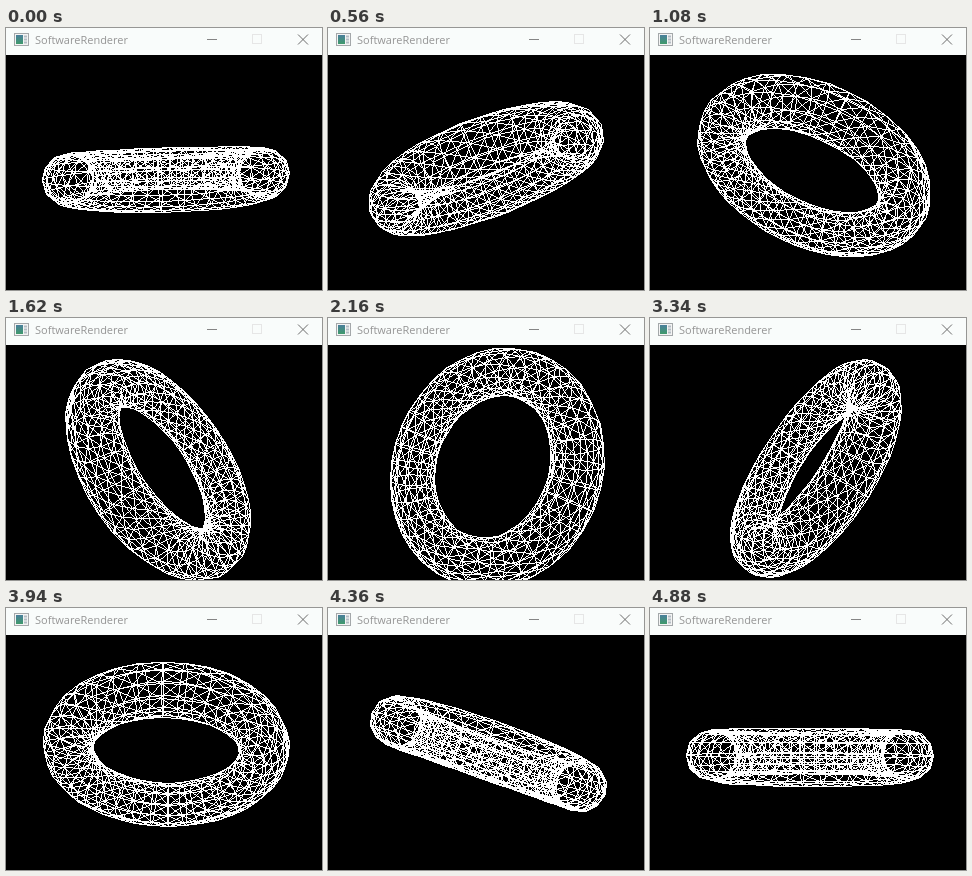
Recreate the animation shown at these times as an HTML page with a canvas. Size 316x262 px, loop 4.92 s.

```html
<!DOCTYPE html>
<html lang="en">
<head>
<meta charset="utf-8">
<title>SoftwareRenderer</title>
<style>
  html, body { margin: 0; width: 100%; height: 100%; overflow: hidden; background: #000; }
  .bar { position: absolute; left: 0; top: 0; display: block; }
  .bar text { font: 11px "Open Sans", "Noto Sans", sans-serif; fill: #959595; }
  canvas { position: absolute; left: 0; top: 27px; display: block; }
</style>
</head>
<body>
<svg class="bar" width="316" height="27" viewBox="0 0 316 27">
  <defs>
    <linearGradient id="pane" x2="0" y2="1">
      <stop offset="0" stop-color="#4a7f9c"/>
      <stop offset="1" stop-color="#3f9a6b"/>
    </linearGradient>
  </defs>
  <rect width="316" height="27" fill="#f9fcfb"/>
  <rect x="8.5" y="5.5" width="14" height="12" fill="#f4f4f4" stroke="#a4a8aa"/>
  <rect x="10" y="7" width="7" height="9" fill="url(#pane)"/>
  <path d="M18 8.5h3M18 11.5h3M18 14.5h3" stroke="#b4bdc4" stroke-width="2"/>
  <text x="29" y="16">SoftwareRenderer</text>
  <g fill="none">
    <path d="M201 11.5h10" stroke="#858585"/>
    <rect x="246.5" y="6.5" width="9" height="9" stroke="#e6e6e6"/>
    <path d="M292 6.5l10 10M302 6.5l-10 10" stroke="#6c6c6c"/>
  </g>
</svg>
<canvas id="view" width="316" height="235"></canvas>
<script>
const LOOP = 4920, W = 316, H = 235;
const CX = 160, CY = 120, FOCAL = 582, DIST = 6;
const RINGS = 36, SIDES = 12, TUBE = 0.25;
const BLACK = 0xff000000, WHITE = 0xffffffff;

// Runs of redraws: start ms, end ms, redraws, turn in tenths of a radian
const RUNS = [
  [40, 560, 18, 18], [600, 1120, 16, 16], [1140, 1660, 16, 16],
  [1700, 2200, 16, 15.6], [2240, 2740, 16, 15.9], [2780, 3300, 18, 18.5],
  [3320, 3840, 19, 19], [3880, 4400, 18, 18], [4420, 4880, 15, 15]
];

const ctx = document.getElementById('view').getContext('2d');
const image = ctx.createImageData(W, H);
const pixels = new Uint32Array(image.data.buffer);

const verts = [];
for (let i = 0; i < RINGS; i++) {
  const u = i / RINGS * 2 * Math.PI;
  for (let j = 0; j < SIDES; j++) {
    const v = j / SIDES * 2 * Math.PI;
    const r = 1 + TUBE * Math.cos(v);
    verts.push([r * Math.cos(u), TUBE * Math.sin(v), r * Math.sin(u)]);
  }
}
const at = (i, j) => (i % RINGS) * SIDES + j % SIDES;

function turnAt(ms) {
  const t = Math.floor(ms / 20) * 20;
  let total = 0;
  for (const [start, end, count, turn] of RUNS) {
    if (t < start) break;
    const done = Math.floor((t - start) / (end - start) * (count - 1) + 0.35);
    total += turn * Math.min(count, done + 1) / count;
  }
  return total;
}

function line([x, y], [x1, y1]) {
  const dx = Math.abs(x1 - x), dy = -Math.abs(y1 - y);
  const sx = x < x1 ? 1 : -1, sy = y < y1 ? 1 : -1;
  let err = dx + dy;
  for (;;) {
    if (x >= 0 && x < W && y >= 0 && y < H) pixels[y * W + x] = WHITE;
    if (x === x1 && y === y1) return;
    const e2 = 2 * err;
    if (e2 >= dy) { err += dy; x += sx; }
    if (e2 <= dx) { err += dx; y += sy; }
  }
}

function render(turn) {
  const pitch = 0.02 * (turn + 4), yaw = 0.1 * (turn + 4);
  const cp = Math.cos(pitch), sp = Math.sin(pitch);
  const cy = Math.cos(yaw), sy = Math.sin(yaw);
  const pts = verts.map(([x, y, z]) => {
    const y1 = y * cp - z * sp, z1 = y * sp + z * cp;
    const scale = FOCAL / (DIST - x * sy + z1 * cy);
    return [
      Math.floor(CX + (x * cy + z1 * sy) * scale),
      Math.floor(CY + y1 * scale)
    ];
  });
  pixels.fill(BLACK);
  for (let i = 0; i < RINGS; i++) {
    for (let j = 0; j < SIDES; j++) {
      const p = pts[at(i, j)];
      line(p, pts[at(i + 1, j)]);
      line(p, pts[at(i, j + 1)]);
      line(p, pts[at(i + 1, j + 1)]);
    }
  }
  ctx.putImageData(image, 0, 0);
}

let origin = null, shown = -1;
function tick(now) {
  if (origin === null) origin = now;
  const turn = turnAt((now - origin) % LOOP);
  if (turn !== shown) render(shown = turn);
  requestAnimationFrame(tick);
}
render(0);
requestAnimationFrame(tick);
</script>
</body>
</html>
```
